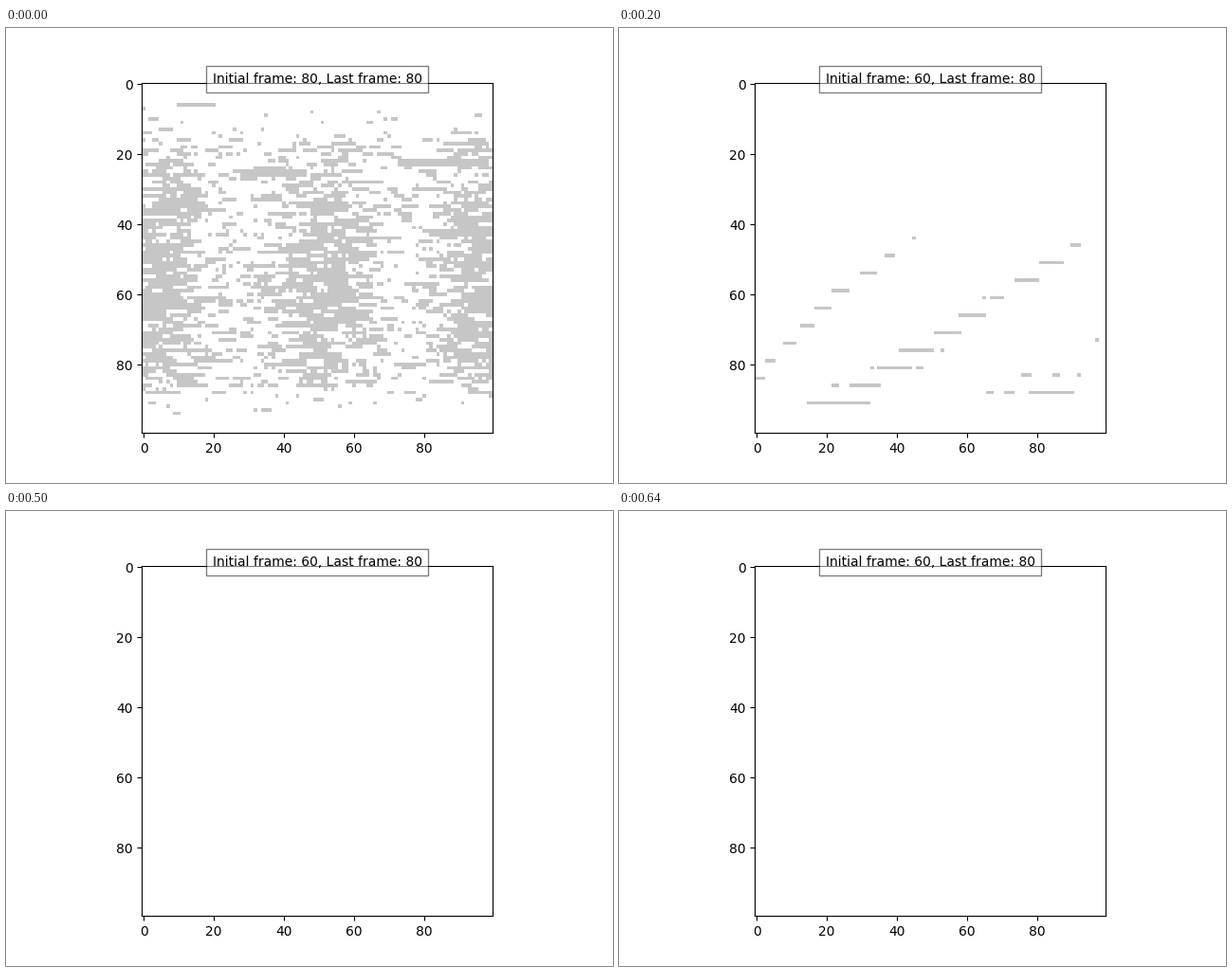
These frames come from a looping animation (640 px wide and 480 px high, 740 ms). A matplotlib script:

```python
import numpy as np
import matplotlib.pyplot as plt
from matplotlib.animation import FuncAnimation

SIZE = 100
STEP_MS = 20
LOOP_MS = 740
ROW_STEP = 5


def dash_texture(seed, length=4):
    """Evenly spread values in 0..1 that cling together along each row."""
    noise = np.random.default_rng(seed).normal(size=(SIZE, SIZE + length - 1))
    smooth = sum(noise[:, i:i + SIZE] for i in range(length))
    return smooth.ravel().argsort().argsort().reshape(SIZE, SIZE) / SIZE**2


def ease_out(start, end, p, power=1):
    return end + (start - end) * (1 - p) ** power


def add_sweep(grid, texture, first_row, count, left, right, power=1):
    """Draw a band of broken dashes that drifts sideways from row to row."""
    for i in range(count):
        p = i / (count - 1)
        start = round(ease_out(*left, p, power))
        stop = round(ease_out(*right, p))
        across = np.linspace(0, 1, stop - start)
        chance = 0.95 - 0.8 * abs(2 * across - 0.8)
        row = first_row + ROW_STEP * i
        grid[row, start:stop] = texture[row, start:stop] < chance


def upper_sweeps():
    grid, texture = np.zeros((SIZE, SIZE)), dash_texture(7)
    add_sweep(grid, texture, 17, 8, left=(25, 3), right=(49, 5), power=4)
    add_sweep(grid, texture, 14, 8, left=(80, 56), right=(96, 67), power=4)
    return grid


def lower_sweeps():
    grid, texture = np.zeros((SIZE, SIZE)), dash_texture(11)
    add_sweep(grid, texture, 44, 9, left=(44, 0), right=(47, 4), power=1.5)
    add_sweep(grid, texture, 46, 10, left=(90, 12), right=(96, 41))
    add_sweep(grid, texture, 73, 4, left=(95, 66), right=(100, 98))
    return grid


def dense_field():
    """Dashes in three broad columns, thinning out at the top and bottom."""
    rows, cols = np.mgrid[:SIZE, :SIZE]
    wave = np.cos(2 * np.pi * (cols - 4) / 47)
    envelope = np.interp(rows, [4, 12, 14, 28, 38, 78, 85, 88, 95],
                         [0, 0.05, 0.4, 0.65, 1, 1, 0.7, 0.15, 0])
    chance = envelope * (0.52 + 0.3 * wave)
    grid = (dash_texture(4) < chance).astype(float)
    grid[6, 10:21] = 1
    grid[22:24, 73:99] = 1
    grid[25:27, 28:47] = 1
    return grid


dense, upper, lower = dense_field(), upper_sweeps(), lower_sweeps()
empty = np.zeros((SIZE, SIZE))
starts = [0, 100, 200, 300, 400, 500, 540, 640]
states = [dense, upper, lower, empty, upper, empty, lower, empty]

fig, ax = plt.subplots(figsize=(6.4, 4.8), dpi=100)
image = ax.imshow(empty, cmap="gray_r", vmin=0, vmax=255 / 57,
                  interpolation="nearest")
label = ax.text(0.5, 1.0, "", transform=ax.transAxes, ha="center",
                bbox={"facecolor": "w", "alpha": 0.5, "pad": 5})


def update(frame):
    index = np.searchsorted(starts, frame * STEP_MS, side="right") - 1
    image.set_data(states[index])
    initial = 80 if index == 0 else 60
    label.set_text(f"Initial frame: {initial}, Last frame: 80")
    return image, label


anim = FuncAnimation(fig, update, frames=LOOP_MS // STEP_MS,
                     interval=STEP_MS, repeat=True, repeat_delay=0)
plt.show()
```
